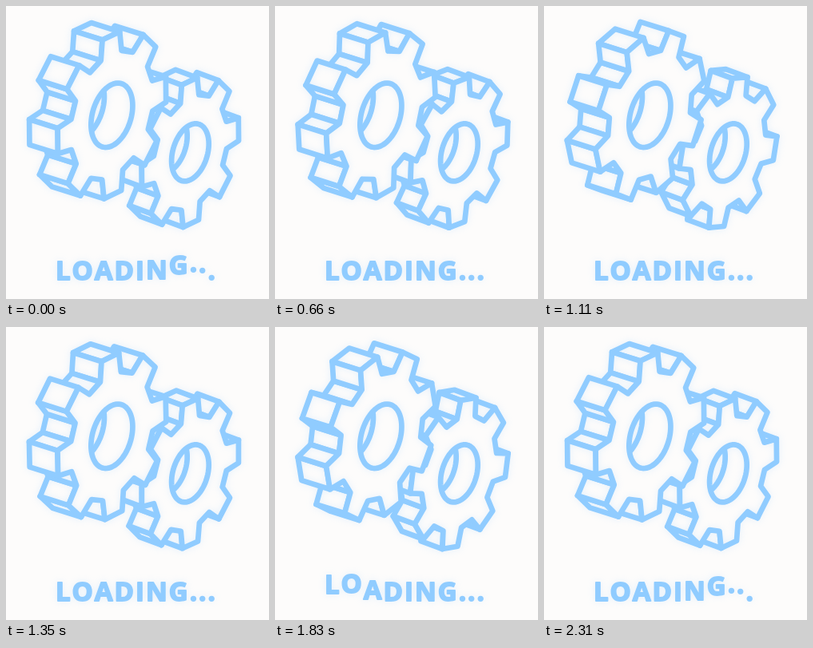
An HTML page with a canvas for the animation above (2340 ms loop, 329 by 367 pixels).

```html
<!DOCTYPE html>
<html lang="en">
<head>
<meta charset="utf-8">
<title>Loading</title>
<style>
  html, body { margin: 0; width: 100%; height: 100%; overflow: hidden; background: #fdfcfb; }
  canvas { display: block; filter: drop-shadow(0 0 5px rgba(140, 200, 255, .22)); }
</style>
</head>
<body>
<canvas id="stage" width="329" height="367"></canvas>
<script>
const ctx = document.getElementById('stage').getContext('2d');
const LOOP = 2340, CYCLE = 2310, TEETH = 8, RAD = Math.PI / 180;

// Images of the gear plane's two unit axes: up and left
const UP = [-1, -100], LEFT = [-68, 32.5];
// Tooth outline: [degrees from tooth centre, radius]
const TOOTH = [[-14.3, .77], [-9.1, 1.007], [9.1, 1.007], [14.3, .77]];

const SMALL = { x: 230.4, y: 183.4, scale: .895, depth: [-27, -10], dir: -1 };
const BIG = { x: 132.4, y: 136.8, scale: 1, depth: [-35.5, -11.2], dir: 1 };

// Turn keys: [ms, teeth passed]
const KEYS = [[0, 0], [390, 1.18], [870, 4.95], [1110, 7.32], [1350, 10.01], [1830, 14.255], [CYCLE, 16]];

function speed(t) {
  const x = t / CYCLE;
  return 16 * 6 * x * (1 - x) / CYCLE;
}

function teethPassed(t) {
  let i = 1;
  while (i < KEYS.length - 1 && t > KEYS[i][0]) i++;
  const [t0, a] = KEYS[i - 1], [t1, b] = KEYS[i];
  const span = t1 - t0, u = Math.min(1, (t - t0) / span), v = 1 - u;
  return a + (b - a) * u * u * (3 - 2 * u)
    + span * u * v * (speed(t0) * v - speed(t1) * u);
}

function project(gear, degrees, radius) {
  const c = Math.cos(degrees * RAD) * radius * gear.scale;
  const s = Math.sin(degrees * RAD) * radius * gear.scale;
  return [gear.x + c * UP[0] + s * LEFT[0], gear.y + c * UP[1] + s * LEFT[1]];
}

function polygon(points) {
  const path = new Path2D();
  points.forEach(p => path.lineTo(p[0], p[1]));
  path.closePath();
  return path;
}

function erase(path) {
  ctx.globalCompositeOperation = 'destination-out';
  ctx.fill(path);
  ctx.globalCompositeOperation = 'source-over';
}

function drawGear(gear, teeth) {
  const [dx, dy] = gear.depth;
  const shift = p => [p[0] + dx, p[1] + dy];
  const along = p => p[0] * dx + p[1] * dy;

  const rim = [];
  for (let k = 0; k < TEETH; k++)
    for (const [deg, r] of TOOTH)
      rim.push(project(gear, (k + gear.dir * teeth) * 360 / TEETH + deg, r));

  // Side walls turned towards the viewer, far ones first
  rim.map((p, i) => [p, rim[(i + 1) % rim.length]])
    .filter(([p, q]) => (p[1] - q[1]) * dx + (q[0] - p[0]) * dy > 0)
    .sort((a, b) => along(a[0]) + along(a[1]) - along(b[0]) - along(b[1]))
    .forEach(([p, q]) => {
      const wall = polygon([p, q, shift(q), shift(p)]);
      erase(wall);
      ctx.stroke(wall);
    });

  const ring = Array.from({ length: 72 }, (_, i) => project(gear, i * 5, .383));
  const hole = polygon(ring), face = polygon(rim);
  erase(face);
  ctx.save();
  ctx.clip(hole);
  ctx.stroke(polygon(ring.map(shift)));
  ctx.restore();
  ctx.stroke(hole);
  ctx.stroke(face);
}

// Hop of one letter: quick eased rise, then a fall
function hop(age) {
  if (age <= 0 || age >= 300) return 0;
  if (age > 105) return 10 * (1 - ((age - 105) / 195) ** 2);
  const x = age / 105;
  return 10 * (x < .5 ? 4 * x ** 3 : 1 - 4 * (1 - x) ** 3);
}

function drawText(t) {
  ctx.font = '700 33px "Open Sans", "Noto Sans", sans-serif';
  ctx.lineWidth = 1.8;
  let x = 61.9;
  [...'LOADING...'].forEach((ch, i) => {
    const age = t - 1644 - 74 * i;
    const y = 342.6 - hop(age) - hop(age + CYCLE);
    ctx.fillText(ch, x, y);
    ctx.strokeText(ch, x, y);
    x += ctx.measureText(ch).width + 2;
  });
}

function draw() {
  const t = Math.min(performance.now() % LOOP, CYCLE);
  const teeth = teethPassed(t);
  ctx.clearRect(0, 0, 329, 367);
  ctx.fillStyle = ctx.strokeStyle = '#90ccff';
  ctx.lineWidth = 6.7;
  ctx.lineJoin = 'round';
  drawGear(SMALL, teeth);
  drawGear(BIG, teeth);
  drawText(t);
  requestAnimationFrame(draw);
}
draw();
</script>
</body>
</html>
```
